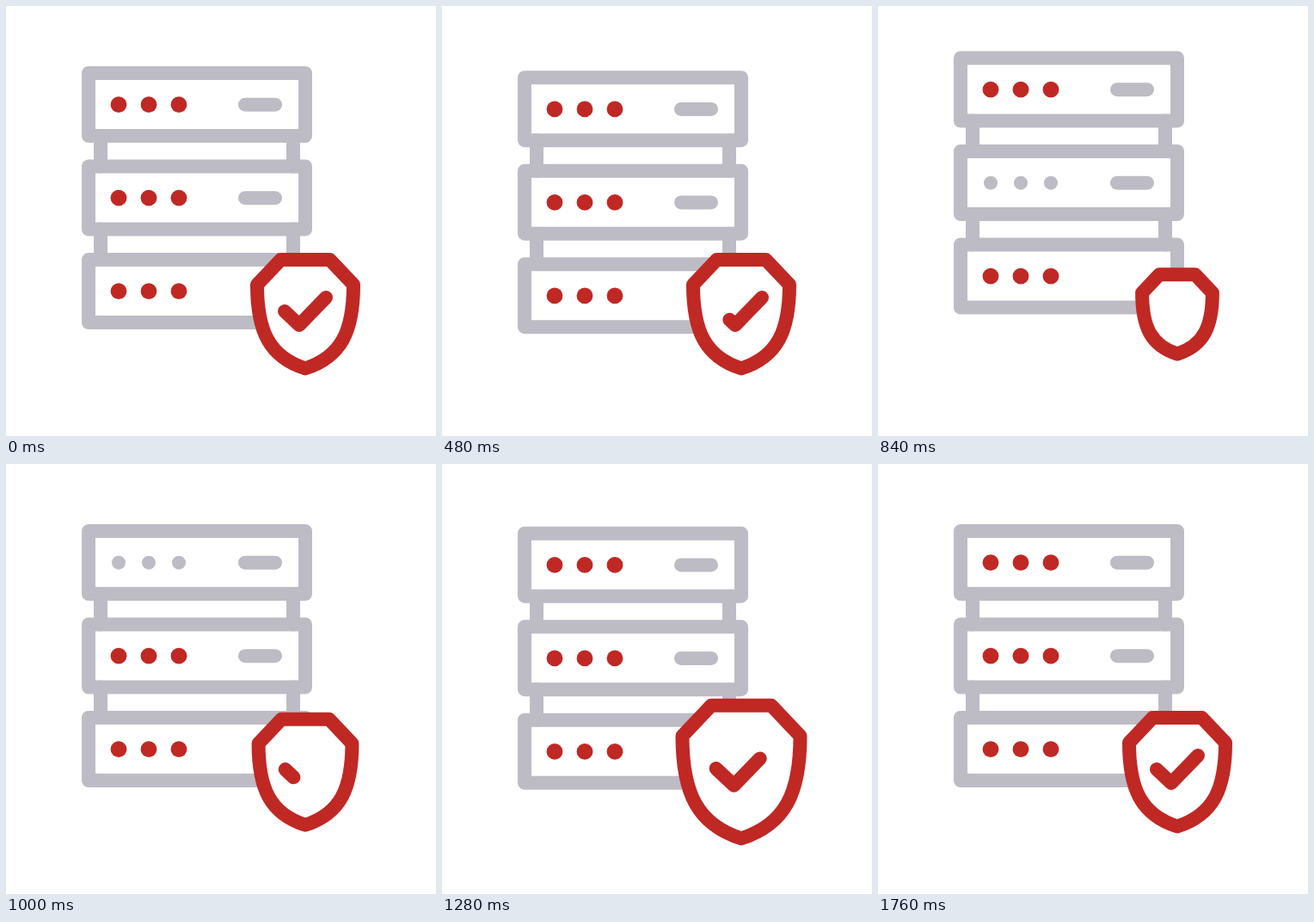
These frames come from a looping animation (500x500 px, 2080 ms). An HTML page with a canvas:

```html
<!DOCTYPE html>
<html lang="en">
<head>
<meta charset="utf-8">
<title>Secure server</title>
<style>
  html, body { margin: 0; height: 100%; overflow: hidden; background: #fff; }
  canvas { display: block; }
</style>
</head>
<body>
<canvas id="stage" width="500" height="500"></canvas>
<script>
const ctx = document.getElementById('stage').getContext('2d');
const LOOP = 2080, STEP = 40;
const GREY = '#bdbcc5', RED = '#c02824';

// [time in ms, value], eased between neighbours
const rackShift = [[200, 0], [715, 9.2], [815, -18], [1125, 10], [1440, -5], [1745, 0]];
const shieldScale = [[595, 1], [840, 0.73], [1200, 1.31], [1490, 0.845], [1745, 1]];

// The red lights go out for a moment, row by row from the bottom
const BLINK = 120, blinkStart = [900, 780, 660];

const clamp = v => Math.min(1, Math.max(0, v));

function valueAt(keys, t) {
  let value = keys[0][1];
  for (let i = 1; i < keys.length; i++) {
    const [t0, v0] = keys[i - 1], [t1, v1] = keys[i];
    if (t < t0) break;
    const p = clamp((t - t0) / (t1 - t0));
    value = v0 + (v1 - v0) * p * p * (3 - 2 * p);
  }
  return value;
}

function line(...points) {
  ctx.beginPath();
  for (const [x, y] of points) ctx.lineTo(x, y);
  ctx.stroke();
}

function drawRack(t) {
  ctx.save();
  ctx.translate(0, valueAt(rackShift, t));
  ctx.strokeStyle = GREY;
  for (let row = 0; row < 3; row++) {
    const top = 78 + row * 108.5;
    ctx.strokeRect(96, top, 252, 73);
    if (row < 2) {
      line([278, top + 36.7], [313, top + 36.7]);
      for (const x of [110, 334]) line([x, top + 73], [x, top + 108.5]);
    }
    const off = t >= blinkStart[row] && t < blinkStart[row] + BLINK;
    ctx.fillStyle = off ? GREY : RED;
    for (const x of [131, 166, 201]) {
      ctx.beginPath();
      ctx.arc(x, top + 36.7, off ? 8 : 9.4, 0, 2 * Math.PI);
      ctx.fill();
    }
  }
  ctx.restore();
}

// Paths are scaled while the line width stays constant
function scaledPath(scale, build) {
  ctx.save();
  ctx.translate(348, 359);
  ctx.scale(scale, scale);
  ctx.beginPath();
  build();
  ctx.restore();
}

function drawShield(t) {
  const scale = valueAt(shieldScale, t);
  ctx.strokeStyle = RED;
  ctx.fillStyle = '#fff';
  scaledPath(scale, () => {
    ctx.moveTo(-28.5, -64);
    ctx.lineTo(28.5, -64);
    ctx.lineTo(56, -35);
    ctx.bezierCurveTo(56, 19, 42, 49, 0, 62.5);
    ctx.bezierCurveTo(-42, 49, -56, 19, -56, -35);
    ctx.closePath();
  });
  ctx.fill();
  ctx.stroke();

  const erasing = t < 860;
  const from = erasing ? clamp((t - 392) / 421) : 0;
  const to = erasing ? 1 : clamp((t - 915) / 421);
  if (to <= from) return;
  const length = (Math.hypot(17, 16) + Math.hypot(31, 32)) * scale;
  scaledPath(scale, () => {
    ctx.moveTo(-24, -4);
    ctx.lineTo(-7, 12);
    ctx.lineTo(24, -20);
  });
  ctx.save();
  ctx.setLineDash([length * (to - from) + 0.1, 999]);
  ctx.lineDashOffset = -length * from;
  ctx.stroke();
  ctx.restore();
}

function draw(now) {
  const t = Math.floor((now % LOOP) / STEP) * STEP;
  ctx.clearRect(0, 0, 500, 500);
  ctx.lineWidth = 16;
  ctx.lineCap = ctx.lineJoin = 'round';
  drawRack(t);
  drawShield(t);
  requestAnimationFrame(draw);
}
requestAnimationFrame(draw);
</script>
</body>
</html>
```
